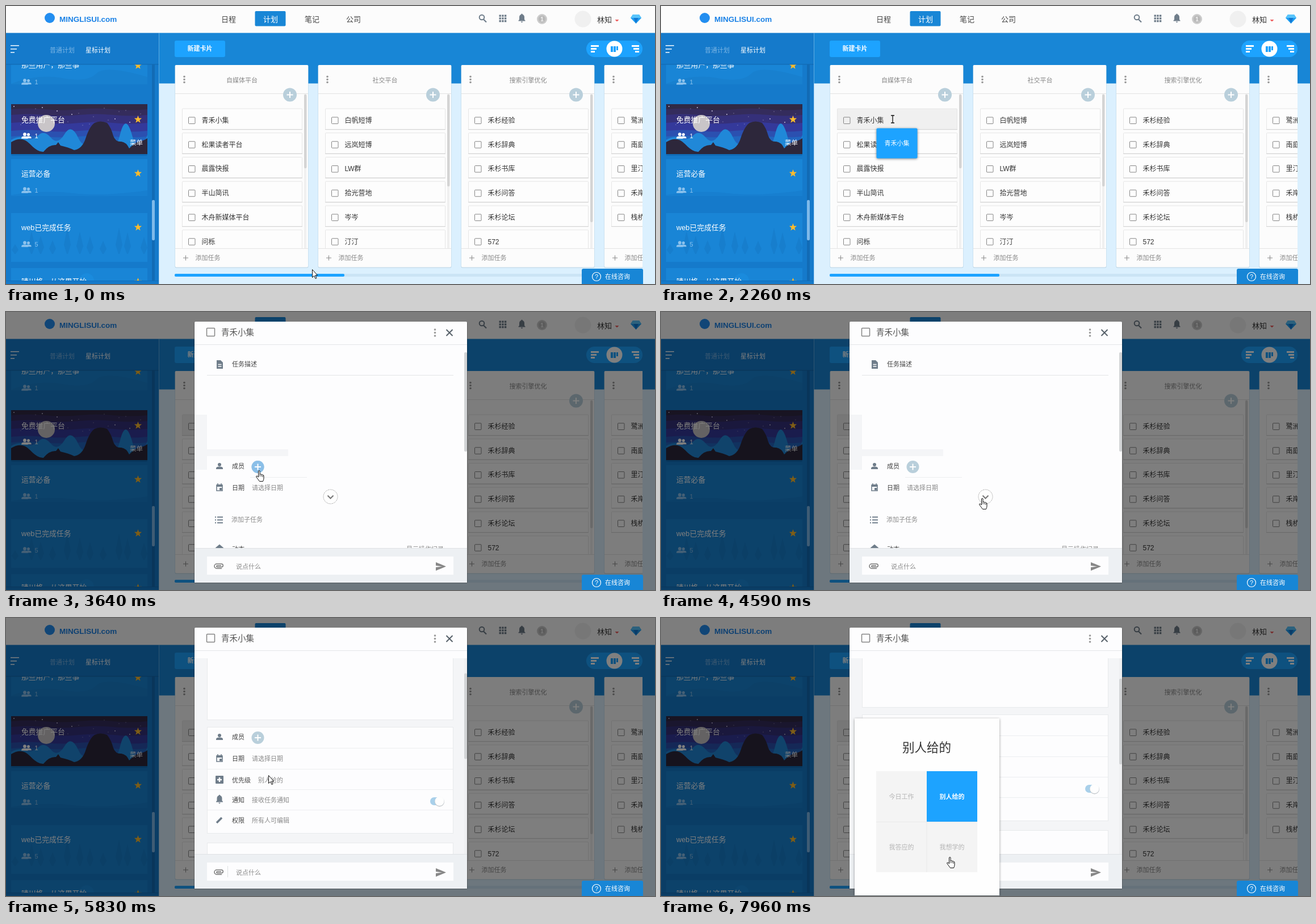
An HTML page for the animation above (8000 ms loop, 1143x490 px).

```html
<!DOCTYPE html>
<html lang="zh">
<head>
<meta charset="utf-8">
<title>计划看板</title>
<style>
html, body { margin: 0; width: 100%; height: 100%; overflow: hidden; background: #dbf0fe; }
svg { display: block; width: 1143px; height: 490px; }
text { font-family: "Liberation Sans", "Noto Sans CJK SC", "Noto Sans CJK", sans-serif; white-space: pre; }
</style>
</head>
<body>
<svg id="stage" viewBox="0 0 1143 490"></svg>
<script>
const BLUE = '#1da3ff', MID = '#1886d6', ICON = '#6f7d8a';

// Shape helpers; text is placed by its vertical centre.
const rect = (x, y, w, h, fill, more = '') =>
  `<rect x="${x}" y="${y}" width="${w}" height="${h}" fill="${fill}" ${more}/>`;
const circle = (x, y, r, fill, more = '') => `<circle cx="${x}" cy="${y}" r="${r}" fill="${fill}" ${more}/>`;
const path = (d, fill, more = '') => `<path d="${d}" fill="${fill}" ${more}/>`;
const line = (d, color, width = 1, more = '') =>
  path(d, 'none', `stroke="${color}" stroke-width="${width}" ${more}`);
const text = (x, y, size, fill, str, more = '') =>
  `<text x="${x}" y="${y + size * 0.37}" font-size="${size}" fill="${fill}" ${more}>${str}</text>`;
const mid = (x, y, size, fill, str, more = '') => text(x, y, size, fill, str, `text-anchor="middle" ${more}`);
const group = (content, more = '') => `<g ${more}>${content}</g>`;
const move = (x, y, content) => group(content, `transform="translate(${x} ${y})"`);
const clip = (id, x, y, w, h, content) =>
  `<clipPath id="${id}">${rect(x, y, w, h, '#000')}</clipPath>` + group(content, `clip-path="url(#${id})"`);

const plus = (x, y, r, fill, more = '') => group(circle(x, y, r, fill) +
  line(`M${x - 5.5} ${y}h11M${x} ${y - 5.5}v11`, '#fff', 2), more);
const dots = (x, y, gap) => [-gap, 0, gap].map(d => circle(x, y + d, 1.8, '#9a9a9a')).join('');
const box = (x, y, size, width = 1) =>
  rect(x, y, size, size, 'none', `stroke="#858585" stroke-width="${width}" rx="1"`);
const bars = (list, fill) => list.map(b => rect(...b, fill)).join('');
const star = (x, y) => {
  const points = Array.from({ length: 10 }, (_, i) => {
    const r = i % 2 ? 2.9 : 7, a = i * Math.PI / 5;
    return `${x + r * Math.sin(a)},${y - r * Math.cos(a)}`;
  });
  return `<polygon points="${points.join(' ')}" fill="#fdbb2c"/>`;
};
const person = (x, y, fill, s = 1) => circle(x, y - 3 * s, 3 * s, fill) +
  path(`M${x - 6 * s} ${y + 5 * s}v${-1.5 * s}q0 ${-3 * s} ${6 * s} ${-3 * s}t${6 * s} ${3 * s}v${1.5 * s}z`, fill);
const people = (x, y, n, fill) => person(x + 3.5, y, fill, .85) + person(x - 3, y, fill, .95) +
  text(x + 14.5, y, 11, fill, n);
const bell = (x, y) => path(`M${x - 6} ${y + 4.5}v-1l1.5-1.5v-4q0-4.2 3.3-5v-1.2h2.4v1.2q3.3.8 3.3 5v4l1.5 1.5v1z` +
  `M${x - 1.6} ${y + 5.5}h3.2q0 1.8-1.6 1.8t-1.6-1.8`, ICON);

function header() {
  const grid = [0, 1, 2].flatMap(i => [0, 1, 2].map(j => [868.5 + i * 4.7, 15.5 + j * 4.7, 3.4, 3.4]));
  return rect(0, 0, 1143, 47.5, '#fcfcfc') + circle(77, 21, 9, '#238ef0') +
    text(94, 23, 13.5, '#1b82e6', 'MINGLISUI.com', 'font-weight="bold"') +
    rect(438.5, 9, 54, 26.5, MID, 'rx="2"') +
    ['日程', '计划', '笔记', '公司'].map((s, i) =>
      mid([392, 466, 539, 612][i], 23, 13, i === 1 ? '#fff' : '#444', s)).join('') +
    circle(838, 20, 4.3, 'none', `stroke="${ICON}" stroke-width="2"`) + line('M841 23.5l5 5', ICON, 2.2) +
    bars(grid, ICON) + bell(908.5, 22) +
    circle(944, 23, 9, '#cbcbcb') + circle(944, 23, 6.2, '#b9b9b9') +
    mid(944, 23, 10, '#f2f2f2', '1', 'font-weight="bold"') +
    circle(1016, 23, 14.5, '#f0f0f0') + text(1041, 24, 13, '#333', '林知') +
    path('M1072.500 24h7l-3.500 3.500z', '#ee5b5b') +
    path('M1104 15h11l4 6-9.500 10-9.500-10z', '#1c9df2') + path('M1100 21h19l-4-6h-11z', '#58c4fb') +
    path('M1105.500 21h8l-4 10z', '#1277d2');
}

function nightScene() {
  const bands = [[181, '#342c5c'], [191, '#35307a'], [205, '#34399b'], [219, '#2b50b0'], [229, '#2265bf']];
  const sky = bands.map(([y, c]) =>
    path(`M9 ${y + 1}q30-3 60 0t60 0 60 0 60 0V261H9z`, c)).join('');
  const stars = Array.from({ length: 22 }, (_, i) =>
    circle(14 + i * 83 % 230, 177 + i * 29 % 34, i % 4 ? .5 : .9, '#cfc8e6')).join('');
  return clip('scene', 9, 173, 240, 88, rect(9, 173, 240, 88, '#302945') + sky + stars +
    circle(71, 207, 15, '#c9c5c8') +
    path('M9 236q14-8 26-3t22-5 22 4 24-6 24 6 26-6 26 4 22-4 22 5 26-4V261H9z', '#2088d8') +
    path('M9 240Q28 228 42 243T66 257Q76 244 88 245l4-5 4 6q14 3 24 8 14-2 20-20 7-22 16-28 10-5 22 0' +
      ' 7 8 11 23 4 11 14 10 9 1 14 12 10-11 20-13 7-1 12-5V261H9z', '#2d273b'));
}

function sidebar() {
  const pale = '#8cc2ed', card = '#1985d6', titled = 'font-weight="500"';
  const trees = Array.from({ length: 11 }, (_, i) => {
    const x = 16 + i * 22 + i * i * 7 % 9, h = 14 + i * 23 % 31;
    return path(`M${x} ${434 - h}l6 ${h * .7}-5 ${h * .3 + 3}h-2l-5-${h * .3 + 3}z`, '#177ecd');
  }).join('');
  const item = (y, name, n) => text(27, y, 12.8, '#fff', name, titled) + star(232.5, y) + people(36, y + 30, n, pale);
  const list = rect(9, 90, 240, 48, card) + path('M9 137q45-18 90-10t60-8 90 6v13H9z', '#1880cf') +
    text(27, 103, 12.8, '#fff', '那些用户，那些事', titled) + star(232.5, 105) + people(36, 134, 1, pale) +
    rect(9, 176, 240, 88, '#0d5ea6', 'opacity=".5" rx="2"') + nightScene() +
    text(27, 200, 12.8, '#fff', '免费推广平台', titled) + star(232.5, 200) + people(36, 229, 1, '#fff') +
    text(218, 241, 11.5, '#fff', '菜单', titled) +
    rect(9, 270, 240, 65, card) + path('M9 333q60-9 110-3t130-5v10H9z', '#177fd0') + item(295, '运营必备', 1) +
    rect(9, 365, 240, 86, card) + trees + item(390, 'web已完成任务', 5) +
    rect(9, 462, 240, 30, card) + circle(142, 484, 13, '#1a8bdd') +
    text(27, 485, 12.8, '#fff', '晴川格，从这里开始', titled) + star(232.5, 486);
  return rect(0, 47.5, 269.5, 443, '#157acb') + clip('list', 0, 103, 269, 382, list) +
    rect(0, 102, 269, 1.5, '#126db8') + rect(0, 484, 269, 1, '#126db8') +
    rect(257, 103, 5, 381, '#126bb5') + rect(257, 342, 5, 71, '#7fb9e9', 'rx="2"') +
    bars([[8, 69, 15, 1.6], [8, 75, 11, 1.6], [8, 81, 7, 1.6]], '#e6f3fd') +
    text(77, 78, 11, '#79b4e4', '普通计划') + text(140, 78, 11, '#fff', '星标计划', titled);
}

const columns = [
  ['自媒体平台', 130, ['青禾小集', '松果读者平台', '晨露快报', '半山简讯', '木舟新媒体平台', '问栎']],
  ['社交平台', 162, ['白帆短博', '远岚短博', 'LW群', '拾光营地', '岑岑', '汀汀']],
  ['搜索引擎优化', 225, ['禾杉经验', '禾杉辞典', '禾杉书库', '禾杉问答', '禾杉论坛', '572']],
  ['', 0, ['鹭洲', '南庭', '里汀', '禾岸', '栈桥']]
];

function column([title, thumb, tasks], i) {
  const rows = tasks.map((name, k) => {
    const y = 181 + k * 42.75;
    return rect(12.5, y, 211, 36.500, '#fdfdfd', `stroke="#e6e6e6" rx="1" ${i + k ? '' : 'id="row"'}`) +
      rect(12, y + 36, 212, 1.2, '#d4d4d4') + box(23.5, y + 15, 11.5) + text(46.5, y + 20.5, 12, '#333', name);
  }).join('');
  return move(298 + i * 252, 0,
    rect(-.5, 104, 235, 357.5, '#b9d3e4', 'rx="2"') + rect(0, 104, 234, 356.5, '#fcfcfc', 'rx="2"') +
    dots(16, 129.5, 5) + mid(117.5, 131, 11, '#888', title) + rect(0, 154, 234, 1, '#e2e2e2') +
    clip('col' + i, 0, 155, 234, 272, rows) +
    (thumb ? rect(227, 155, 4, 272, '#f0f0f0') + rect(227, 156, 4.5, thumb, '#d4d4d4', 'rx="2"') +
      plus(202, 156.5, 12, '#b9cfdb') : '') +
    rect(0, 427, 234, 1, '#e4e4e4') + line('M14 444h9M18.500 439.500v9', '#888') +
    text(35.5, 444, 11, '#888', '添加任务'));
}

function board() {
  return rect(269.5, 47.5, 874, 443, '#dbf0fe') + rect(269.5, 47.5, 874, 89, MID) +
    rect(297, 61, 89, 29, BLUE, 'rx="3"') + mid(341.5, 75, 11, '#fff', '新建卡片', 'font-weight="bold"') +
    rect(1022, 61, 99, 29, BLUE, 'rx="14.5"') + circle(1071.5, 75.5, 14, '#fff') +
    bars([[1030, 69, 14, 3], [1030, 74, 10, 3], [1030, 79, 7, 3],
      [1102, 69, 13, 3], [1105, 74, 10, 3], [1108, 79, 7, 3]], '#fff') +
    bars([[1065, 71, 4, 10], [1070, 71, 4, 10], [1075, 71, 3, 7]], BLUE) +
    clip('board', 269, 95, 852, 372, columns.map(column).join('')) +
    rect(297, 472, 824, 5, '#cbe4f5', 'rx="2"') + rect(297, 472, 299, 5, BLUE, 'rx="2"');
}

function modal() {
  const label = (y, s) => text(398, y, 11, '#444', s);
  const value = (x, y, s) => text(x, y, 11, '#8a8a8a', s);
  const panel = (y, h) => rect(354.5, y + .5, 433, h, '#fdfdfe', 'stroke="#e8eaec"');
  const task = path('M371 85h7l4 4v11h-11z', ICON) + line('M373.500 92.500h6M373.500 96h6', '#fff', 1.3) +
    label(92, '任务描述') + rect(354, 111, 434, 1, '#e3e5e7');
  const fields = person(376, 272, ICON) + label(272, '成员') +
    line('M371 305h10v10h-10zM373 302v2M379 302v2', ICON, 1.6) + rect(371, 304, 10, 4, ICON) +
    rect(376, 310, 4, 4, ICON) + label(310, '日期') + value(433, 310, '请选择日期');
  const member = plus(443.5, 273, 11, '#b9cfdb') + plus(443.5, 273, 11, '#8bbfe8', 'id="memberHover"');

  const short = group(
    group(rect(332, 181, 22, 97, '#f4f5f7') + rect(354, 242, 143, 12, '#f4f5f7') +
      rect(430, 291, 100, 1, '#eceef0'), 'id="tint"') +
    task + fields + circle(571.5, 325.5, 12.5, '#fefefe', 'stroke="#aaa" stroke-dasharray="2 1"') +
    line('M566.500 323.500l5 5 5-5', '#777', 2) +
    line('M372 361.500h10M372 366.500h10M372 371.500h10M368 361.500h2M368 366.500h2M368 371.500h2', ICON, 1.8) +
    value(397, 366, '添加子任务') + path('M376 409.500l7 6v6h-14v-6z', ICON) + label(418, '动态') +
    value(705, 418, '显示操作记录') + rect(807, 71, 5, 175, '#d2d4d6', 'rx="2"'), 'id="short"');

  const full = group(rect(332, 71, 480, 346, '#f4f5f7') +
    group(panel(58, 183) + panel(254, 187) + panel(458, 120) + task + fields +
      [291, 328, 364, 400].map(y => rect(355, y, 432, 1, '#eceef0')).join('') +
      rect(369, 340, 14, 14, ICON, 'rx="1"') + line('M372 347h8M376 343v8', '#fdfdfe', 2.5) +
      label(348, '优先级') + value(444, 348, '别人给的') +
      bell(376, 382) + label(383, '通知') + value(433, 383, '接收任务通知') +
      rect(747, 378, 24, 14, '#a9d0ea', 'rx="7"') + circle(763.5, 386, 8.500, '#c4c9cd') +
      circle(763.5, 385, 8, '#fefefe') +
      line('M371 423l9-9', ICON, 3.5) + label(419, '权限') + value(433, 419, '所有人可编辑'), 'id="scroller"') +
    rect(807, 71, 5, 346, '#eff0f2') + rect(807, 71, 5, 151, '#d2d4d6', 'rx="2" id="thumb"') +
    group(rect(332, 71, 22, 110, '#fdfdfe') + rect(788, 71, 19, 149, '#fdfdfe'), 'id="blank"'), 'id="full"');

  return rect(331, 18, 482, 460, '#000', 'opacity=".25" rx="2"') + rect(332, 17, 480, 460, '#fdfdfe', 'rx="2"') +
    clip('body', 332, 71, 480, 346, short + full + group(member, 'id="member"')) +
    rect(332, 57, 480, 1, '#e4e6e8') + box(353.5, 28.500, 14, 1.5) + text(379, 36, 14.5, '#555', '青禾小集') +
    dots(755.5, 36.5, 5.5) + line('M775.500 31l11 11M786.500 31l-11 11', '#566069', 2) +
    rect(332, 416, 480, 61, '#edf0f3') + rect(332, 416, 480, 1, '#dfe2e5') +
    rect(354, 431, 434, 32, '#fdfdfe') + value(405, 448.5, '说点什么') +
    line('M380 452h-9a3.700 3.700 0 0 1 0-8h8.500a2.500 2.500 0 0 1 0 5.500h-7.500a1 1 0 0 1 0-2.500h7', '#777', 1.5) +
    path('M757 441l18 7.500-18 7.500v-6l11-1.500-11-1.500z', '#878787') +
    rect(390, 437, 1, 20, '#dfe1e3', 'id="divider"');
}

function popover() {
  const cell = (x, y, s, on) => rect(x, y, 89, 89, on ? BLUE : '#f4f4f4') +
    mid(x + 44.5, y + 45, 11, on ? '#fff' : '#b4b4b4', s, on ? 'font-weight="bold"' : '');
  return rect(341, 177, 255, 312, '#fefefe', 'style="filter:drop-shadow(0 1px 2px #0006)"') +
    mid(468, 228, 21.5, '#333', '别人给的') + cell(379, 270, '今日工作') + cell(379, 359, '我答应的') +
    cell(468, 359, '我想学的') + rect(379, 359, 178, 1, '#e9e9e9') + rect(467.5, 359, 1, 89, '#e9e9e9') +
    cell(468, 270, '别人给的', true);
}

const ghost = rect(379.5, 215.5, 72, 53, BLUE, 'rx="2" style="filter:drop-shadow(0 1px 2px #0007)"') +
  mid(415.5, 241.5, 11, '#fff', '青禾小集');
const chat = path('M1014 490v-24q0-3 3-3h102q3 0 3 3v24z', MID) +
  circle(1040, 477, 7.5, 'none', 'stroke="#fff" stroke-width="1.2"') + mid(1040, 477, 11, '#fff', '?') +
  text(1055, 476.5, 11, '#fff', '在线咨询', 'font-weight="500"');

const outline = 'stroke="#111" stroke-linejoin="round"';
const pointers = {
  arrow: path('M.5.5v14l3.200-3 2.300 5 2-.9-2.300-4.800h4z', '#fff', outline),
  hand: path('M4.500 12V2q0-1.500 1.300-1.500T7 2v5q2.300-1.300 2.700.5 2-.8 2.400.8 1.900-.2 1.900 1.700v4q0 2.500-1.500 5.500h-6' +
    'Q4 16 1 12q-1-2 .8-2 1.200.3 2.700 2z', '#fff', outline) + line('M7 7v4M9.700 8v3M12 9v3', '#111', .8),
  beam: line('M-3-6.500h2.500l.5.500.5-.5H3M-3 6.500h2.500l.5-.5.5.5H3M0-6V6', '#111', 1.3)
};

document.getElementById('stage').innerHTML = header() + sidebar() + board() +
  rect(0, 0, 1143, 490, '#000', 'fill-opacity=".5" id="dim"') + chat +
  group(modal(), 'id="modal"') + group(ghost, 'id="ghost"') + group(popover(), 'id="popover"') +
  group(Object.entries(pointers).map(([k, s]) => group(s, `id="${k}"`)).join(''), 'id="pointer"');

// Pointer path: time, shape, x, y.
const track = [
  [0, 'arrow', 539, 464], [840, 'arrow', 537, 458], [980, 'arrow', 528, 430], [1115, 'arrow', 508, 380],
  [1255, 'arrow', 480, 318], [1395, 'arrow', 452, 262], [1530, 'arrow', 430, 222], [1670, 'arrow', 404, 190],
  [1810, 'beam', 408, 199.5], [2800, 'arrow', 425, 203], [2940, 'arrow', 455, 222], [3080, 'arrow', 486, 242],
  [3220, 'arrow', 512, 270], [3360, 'arrow', 518, 302], [3500, 'arrow', 480, 300], [3640, 'hand', 440, 279],
  [3790, 'arrow', 457, 306], [3910, 'arrow', 459, 313], [4340, 'arrow', 512, 320], [4590, 'hand', 560, 328],
  [5130, 'arrow', 530, 338], [5260, 'arrow', 483, 332], [5410, 'arrow', 474, 318], [5550, 'arrow', 466, 296],
  [5690, 'arrow', 462, 277], [6070, 'arrow', 440, 265], [6200, 'arrow', 452, 241], [6340, 'arrow', 466, 259],
  [6770, 'hand', 457, 273], [6900, 'hand', 450, 288], [7035, 'hand', 444, 302], [7170, 'hand', 439, 315],
  [7300, 'hand', 435, 324], [7570, 'hand', 448, 345], [7700, 'hand', 470, 380], [7830, 'hand', 490, 408],
  [7960, 'hand', 503, 421]
];
const scrolls = [[0, 0], [5690, 28], [5830, 62], [5950, 84]];
const spans = {
  dim: [2380, 8000], modal: [2380, 8000], ghost: [2110, 2530], tint: [2530, 4990], short: [0, 4990],
  full: [4990, 8000], blank: [4990, 5690], divider: [4990, 8000], memberHover: [3640, 3790], popover: [6640, 8000]
};

const el = id => document.getElementById(id);
const latest = (list, t) => list.findLast(step => step[0] <= t);
const show = (id, on) => el(id).setAttribute('display', on ? 'inline' : 'none');
const shift = (id, x, y) => el(id).setAttribute('transform', `translate(${x} ${y})`);

function draw(now) {
  const t = now % 8000;
  for (const [id, [from, to]] of Object.entries(spans)) show(id, t >= from && t < to);
  const [, shape, x, y] = latest(track, t);
  for (const id in pointers) show(id, id === shape);
  shift('pointer', x, y);
  const scroll = latest(scrolls, t)[1];
  shift('scroller', 0, -scroll);
  shift('member', 0, -scroll);
  shift('thumb', 0, scroll * 36 / 84);
  el('row').setAttribute('fill', t >= 1960 ? '#f0f0f0' : '#fdfdfd');
  el('ghost').setAttribute('opacity', t >= 2380 ? .5 : 1);
}

const start = performance.now();
(function tick() {
  draw(performance.now() - start);
  requestAnimationFrame(tick);
})();
</script>
</body>
</html>
```
